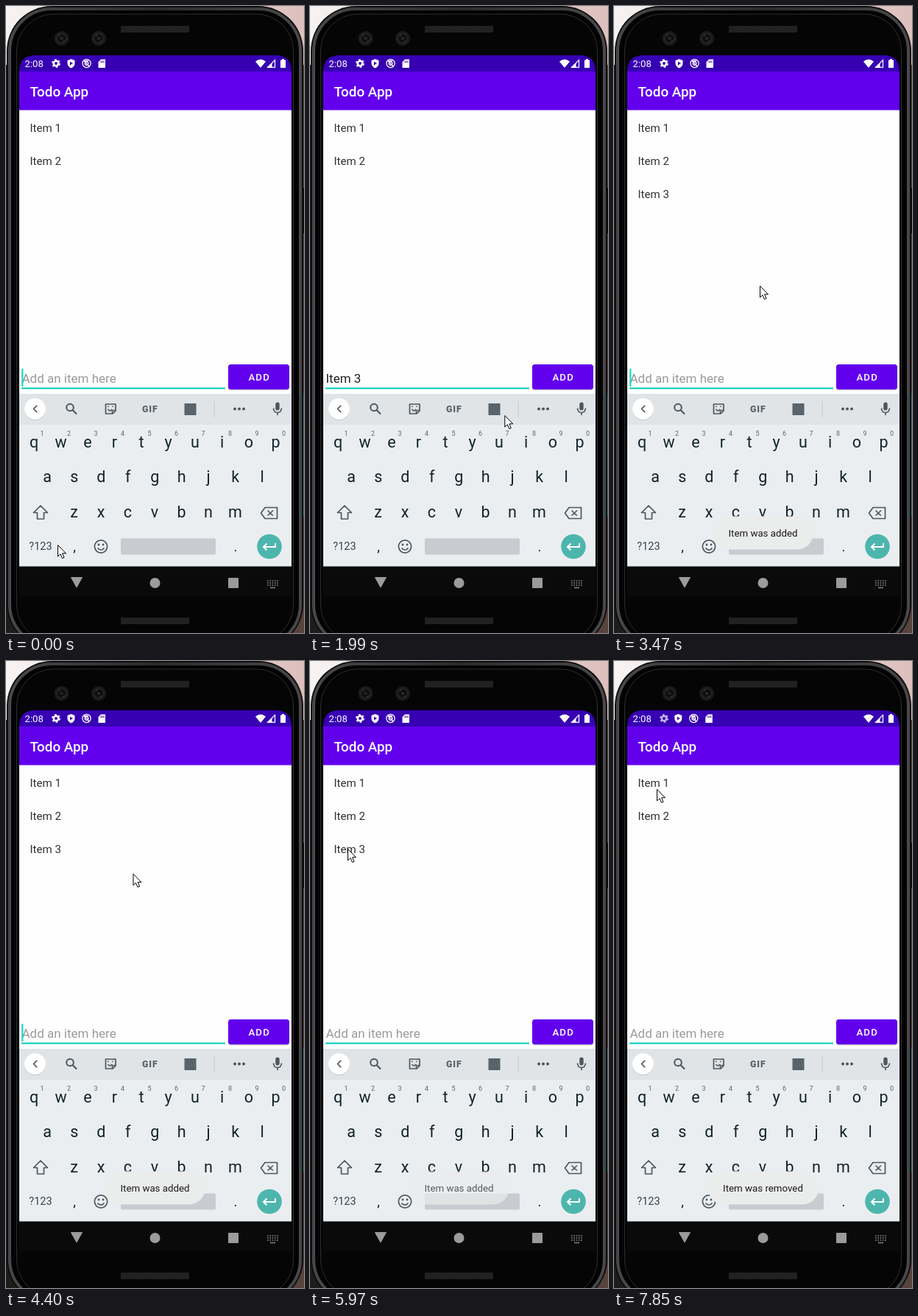
These frames come from a looping animation (405x852 px, 8000 ms). An HTML page:

```html
<!DOCTYPE html>
<html lang="en">
<head>
<meta charset="utf-8">
<title>Todo App</title>
<style>
  html, body { margin: 0; width: 100%; height: 100%; overflow: hidden; background: #111; }
  svg { display: block; width: 100vw; height: 100vh; }
  text { font-family: Roboto, sans-serif; white-space: pre; }
  .mid { text-anchor: middle; }
  .med { font-weight: 500; }
  .line { fill: none; stroke: #4d575d; stroke-width: 1.7; stroke-linejoin: round; }
</style>
</head>
<body>
<svg viewBox="0 0 405 852" preserveAspectRatio="none">
  <defs>
    <linearGradient id="wall"><stop offset="0" stop-color="#f6f3f2"/><stop offset="1" stop-color="#dcc0bd"/></linearGradient>
    <linearGradient id="desk"><stop offset="0" stop-color="#1d1b1b"/><stop offset="1" stop-color="#58433d"/></linearGradient>
    <linearGradient id="rim"><stop offset="0" stop-color="#48484a"/><stop offset=".5" stop-color="#2c2c2d"/><stop offset="1" stop-color="#48484a"/></linearGradient>
    <pattern id="mesh" width="3" height="3" patternUnits="userSpaceOnUse">
      <rect width="3" height="3" fill="#191919"/><path d="M0 3L3 0" stroke="#383838" stroke-width=".8"/>
    </pattern>
    <clipPath id="screen"><path d="M18 802V89Q18 67 40 67H366Q388 67 388 89V802Z"/></clipPath>
  </defs>

  <g>
    <rect width="405" height="852" fill="url(#desk)"/>
    <rect width="405" height="80" fill="url(#wall)"/>
    <rect x="403" y="526" width="2" height="168" fill="#2c7f78"/>
    <rect x="402" y="247" width="3" height="62" rx="1" fill="#0b0b0b"/>
    <rect x="1" y="0" width="403" height="874" rx="61" fill="#0d0d0e"/>
    <rect x="5" y="4" width="395" height="866" rx="57" fill="#030303" stroke="url(#rim)" stroke-width="4"/>
    <rect x="14.5" y="11" width="376" height="853" rx="50" fill="#050505" stroke="#2e2e2f"/>
    <rect x="156" y="27" width="93" height="9" rx="1" fill="url(#mesh)"/>
    <rect x="156" y="831" width="93" height="9" rx="1" fill="url(#mesh)"/>
    <g id="cameras"></g>
  </g>

  <g clip-path="url(#screen)">
    <rect x="18" y="67" width="370" height="735" fill="#0a0a0a"/>
    <rect x="18" y="141" width="370" height="386" fill="#fefefe"/>
    <rect x="18" y="67" width="370" height="23" fill="#3700b3"/>
    <rect x="18" y="89" width="370" height="52.5" fill="#6200ee"/>
    <text x="25.5" y="83" font-size="13.2" fill="#fff">2:08</text>
    <g fill="#fff">
      <g id="gear"><circle cx="68" cy="78" r="3.2" fill="none" stroke="#fff" stroke-width="2.5"/>
        <circle cx="68" cy="78" r="4.9" fill="none" stroke="#fff" stroke-width="2" stroke-dasharray="2.6 2.53"/></g>
      <g id="alerts">
        <path fill-rule="evenodd" d="M88.5 72L93.5 74V78Q93.5 82 88.5 84.500Q83.5 82 83.5 78V74ZM87 75.500V80.500L91 78Z"/>
        <g fill="none" stroke="#fff" stroke-width="1.3"><circle cx="109.5" cy="78" r="5.6"/><circle cx="109.5" cy="78" r="2.3"/>
          <path d="M106 74.500L113 82M107 74.500H112"/></g>
        <path fill-rule="evenodd" d="M129 72.500H135V84H125.500V76ZM128.500 74.500V77H129.500V74.500ZM130.500 74.500V77H131.500V74.500ZM132.500 74.500V77H133.500V74.500Z"/>
      </g>
      <path d="M339 75.500Q346 69.500 353 75.500L346 84Z"/>
      <path d="M365.500 73.500V83.400H355.500Z" fill="none" stroke="#fff" stroke-width="1.2"/>
      <path d="M361.500 77.500V83.500H355Z"/>
      <path d="M373 73.500H375V72H378V73.500H380V84H373Z"/>
    </g>
    <text class="med" x="32.5" y="123" font-size="18.84" fill="#fff">Todo App</text>
    <g id="items" font-size="15.07" fill="#303030"></g>

    <text id="hint" x="21.5" y="512" font-size="17" fill="#9a9a9a">Add an item here</text>
    <text id="input" x="21.5" y="512" font-size="17" fill="#212121"></text>
    <rect id="compose" x="22" y="514" height="1" fill="#212121"/>
    <rect id="caret" y="493" width="2" height="24" fill="#03dac5"/>
    <rect x="21" y="518.5" width="277" height="2" fill="#03cdbb"/>
    <rect x="302" y="488" width="83" height="34.5" rx="4" fill="#000" opacity=".2"/>
    <rect x="302" y="487" width="83" height="34" rx="3.5" fill="#6200ee"/>
    <rect id="ripple" x="302" y="487" width="83" height="34" rx="3.5" fill="#fff"/>
    <text class="mid med" x="344.2" y="509" font-size="13.2" letter-spacing="1.18" fill="#fff">ADD</text>

    <rect x="18" y="527" width="370" height="234.5" fill="#eaeef1"/>
    <rect x="18" y="527" width="370" height="42" fill="#e0e4e7"/>
    <circle cx="39.5" cy="548.5" r="14.5" fill="#000" opacity=".13"/>
    <circle cx="39.5" cy="547.5" r="14.5" fill="#fff"/>
    <path id="chevron" class="line" stroke-linecap="square" d="M41.500 543.500L37.500 547.500L41.500 551.500"/>
    <g id="tools">
      <g class="line"><circle cx="87" cy="545.5" r="4.8" stroke-width="2"/><path d="M90.500 549L96 554.500" stroke-width="2.2"/>
        <path d="M135.500 541H149V550L145 554H135.500ZM149 549.500H144.500V554"/>
        <path d="M138.500 548Q141 552 144 548M139 543.500V545M145 543.500V545" stroke-width="1.5"/></g>
      <text class="mid" x="195.8" y="551.5" font-size="12.3" font-weight="900" letter-spacing="1" fill="#59636a">GIF</text>
      <rect x="242.5" y="540" width="16" height="16" fill="#59636a"/>
      <rect x="282.5" y="537" width="1" height="22" fill="#c3c8cb"/>
      <g fill="#4d575d"><circle cx="311" cy="547.5" r="2"/><circle cx="317" cy="547.5" r="2"/><circle cx="323" cy="547.5" r="2"/></g>
    </g>
    <g id="words" font-size="17" fill="#667076">
      <path d="M148.500 537V559M255.500 537V559" stroke="#c3c8cb"/>
      <text class="mid" x="100" y="554"></text><text class="mid" x="201.5" y="554"></text><text class="mid" x="302.5" y="554"></text>
    </g>
    <rect x="366.3" y="538.5" width="5.4" height="11" rx="2.7" fill="#4d575d"/>
    <path class="line" d="M363.500 546.500Q364 552.500 369 552.500T374.500 546.500M369 552.500V556"/>

    <g id="keys"></g>
    <path class="line" d="M47 679L56.500 688.500H51.500V697H42.500V688.500H37.500Z"/>
    <path class="line" d="M352 681.500H368.500V696.500H352L346.500 689ZM355.500 685.500L363 692.500M363 685.500L355.500 692.500"/>
    <circle class="line" cx="129" cy="734.5" r="8.6"/>
    <path class="line" d="M124.500 736.500Q129 742 133.500 736.500"/>
    <g fill="#4d575d"><circle cx="126" cy="732" r="1.4"/><circle cx="132" cy="732" r="1.4"/></g>
    <rect x="156" y="723.5" width="129" height="22" rx="2" fill="#c8ccd0"/>
    <circle cx="358" cy="734.5" r="16.8" fill="#4db6ac"/>
    <path d="M366 730V735H350.500M354.500 730.500L350 735L354.500 739.500" fill="none" stroke="#fff" stroke-width="2"/>

    <g id="toast">
      <rect y="693.5" height="45" rx="22.5" fill="#ebecec"/>
      <text class="mid" x="202.5" y="720.8" font-size="13.3" fill="#1a1a1a"></text>
    </g>

    <g fill="#9b9b9b">
      <path d="M88.500 776.500H103.500L96 790Z" stroke="#9b9b9b" stroke-linejoin="round"/>
      <circle cx="202.5" cy="784" r="7"/><rect x="302" y="777" width="14" height="14" rx="1"/>
      <path d="M355 781H370M355 784H370M355 787H370" stroke="#858585" stroke-width="1.7" stroke-dasharray="1.7 1.6"/>
      <path d="M359 790.500H366" stroke="#858585" stroke-width="1.5"/>
    </g>
  </g>
  <path id="mouse" d="M.5 .5V16L4 12.700L6.500 18.500L9 17.400L6.600 11.800H11.500Z" fill="#fff" stroke="#000"/>
</svg>
<script>
const LOOP = 8000, BLINK = 479;
const FIRST_KEY = 515, KEY_GAP = 135, PHRASE = 'Item 3';
const ADDED = 2379, REMOVED = 6480, TOAST_STAY = 3500;

const $ = id => document.getElementById(id);
const clamp = u => Math.min(1, Math.max(0, u));
const smooth = u => u * u * (3 - 2 * u);
const set = (el, attrs) => { for (const k in attrs) el.setAttribute(k, attrs[k]); };
const show = (el, on) => set(el, { visibility: on ? 'visible' : 'hidden' });

// Static repeats
const label = (x, y, size, s, color = '#14232a') =>
  `<text class="mid" x="${x}" y="${y}" font-size="${size}" fill="${color}">${s}</text>`;
const row = (chars, x, y, size = 21.5, color) =>
  [...chars].map((c, i) => label(x + i * 36.5, y, size, c, color)).join('');
$('keys').innerHTML = row('qwertyuiop', 38, 600) + row('asdfghjkl', 56.2, 647) + row('zxcvbnm', 92.5, 694.5)
  + row('1234567890', 49, 584.3, 9, '#5b656b')
  + label(47, 739, 14.5, '?123', '#37434a') + label(93, 741, 19, ',') + label(312, 741, 19, '.');
$('items').innerHTML = [1, 2, 3].map(n => `<text x="32.5" y="${126 + 45 * n}">Item ${n}</text>`).join('');
$('cameras').innerHTML = [75.5, 126].map(x => `<g transform="translate(${x} 44)">
  <circle r="10" fill="#1b1b1c"/><circle r="6" fill="#0c0c0e" stroke="#2d2d30"/><circle r="2.5" fill="#222329"/>
  <path d="M-4 -3.5L-2 -4.5M2 4.5L4 3.5" stroke="#55565c"/></g>`).join('');

// Pointer glides: leave at, arrive at, x, y
const glides = [[1700, 2110, 314, 511], [2720, 3350, 198, 380], [3830, 4200, 194, 315],
  [4200, 4930, 78, 174], [5000, 5270, 57, 211], [5270, 5550, 51, 255], [7220, 7750, 58, 174]];

function pointer(t) {
  let x = 70, y = 732;
  for (const [from, to, toX, toY] of glides) {
    const u = smooth(clamp((t - from) / (to - from)));
    x += (toX - x) * u;
    y += (toY - y) * u;
  }
  return `translate(${x} ${y})`;
}

// The caret's rhythm restarts with every edit
function caretOn(t, typed) {
  const edit = t >= ADDED ? ADDED : typed ? FIRST_KEY + (typed - 1) * KEY_GAP : 120 - BLINK;
  return Math.floor((t - edit) / BLINK) % 2 === 0;
}

function toastAlpha(t, start) {
  const rise = clamp((t - start) / 300), fall = clamp((t - start - TOAST_STAY) / 300);
  return 1 - (1 - rise) ** 2 - fall;
}

function guesses(text) {
  return text.length > 4 ? ['2', 'is', 'I'] : [text, text.toLowerCase(), text + 's'];
}

const input = $('input'), third = $('items').lastChild;
const words = $('words').querySelectorAll('text');
const [bubble, message] = $('toast').children;

function draw(t) {
  const typed = Math.min(PHRASE.length, Math.max(0, Math.floor((t - FIRST_KEY) / KEY_GAP) + 1));
  const text = t < ADDED ? PHRASE.slice(0, typed) : '';
  input.textContent = text;
  const width = text ? input.getComputedTextLength() : 0;
  show($('hint'), !text);
  set($('compose'), { width: typed < 5 ? width : 0 });
  set($('caret'), { x: 21.3 + width });
  show($('caret'), caretOn(t, typed));

  const guessing = typed > 1 && t < 1350;
  show($('tools'), !guessing);
  show($('words'), guessing);
  guesses(text).forEach((w, i) => words[i].textContent = w);
  set($('chevron'), { transform: guessing ? 'rotate(180 39.5 547.5)' : '' });

  show(third, t >= ADDED && t < REMOVED);
  set($('ripple'), { opacity: .18 * clamp(1 - Math.abs(t - 2450) / 250) });

  const gone = t >= REMOVED;
  message.textContent = gone ? 'Item was removed' : 'Item was added';
  const half = message.getComputedTextLength() / 2 + 21;
  set(bubble, { x: 203 - half, width: 2 * half });
  set($('toast'), { opacity: toastAlpha(t, gone ? REMOVED : ADDED) });

  const leaving = clamp((t - 7600) / 250);
  set($('gear'), { opacity: 1 - .3 * leaving });
  set($('alerts'), { transform: `translate(${-1.2 * leaving} 0)` });
  set($('mouse'), { transform: pointer(t) });
  show($('mouse'), t < 1600 || t >= 1750);
}

const start = performance.now();
function tick() {
  draw((performance.now() - start) % LOOP);
  requestAnimationFrame(tick);
}
tick();
</script>
</body>
</html>
```
